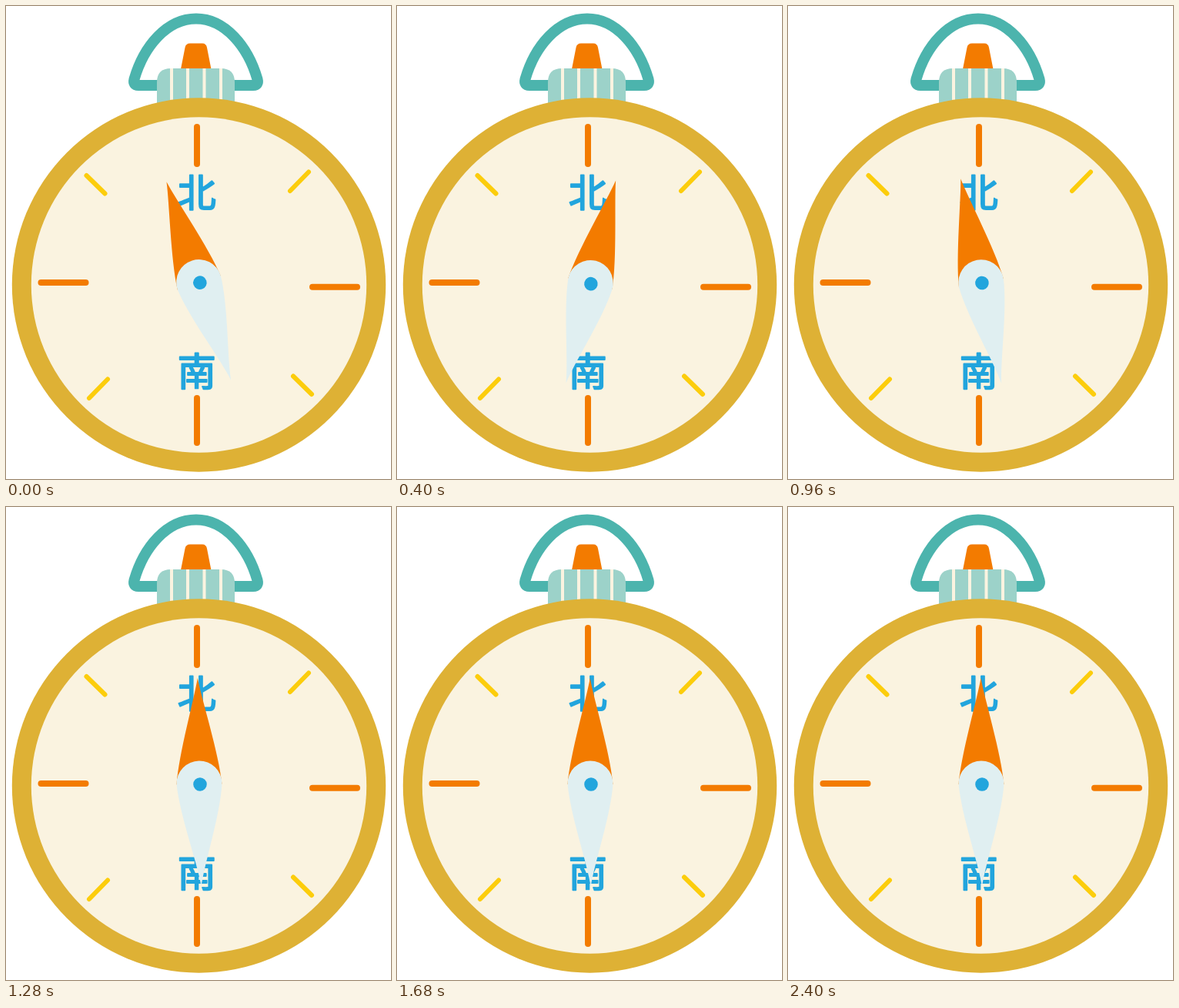
An HTML page with a canvas for the animation above (2900 ms loop, 500 px wide and 614 px high).

```html
<!DOCTYPE html>
<html lang="ja">
<head>
<meta charset="utf-8">
<title>Compass</title>
<style>
  html, body { margin: 0; width: 100%; height: 100%; overflow: hidden; background: #fff; }
  canvas { display: block; width: 500px; height: 614px; }
</style>
</head>
<body>
<canvas id="stage" width="500" height="614"></canvas>
<script>
const ctx = document.getElementById('stage').getContext('2d');

const LOOP = 2900, STEP = 80, LAST_STEP = 30;
const COLORS = {
  gold: '#deb135', cream: '#faf3e0', orange: '#f37b00', yellow: '#fccd0c',
  teal: '#4cb4ad', mint: '#9cd2c9', blue: '#22a5dd', pale: '#e0eff1'
};

// Turning points of the damped swing: [ms, degrees]
const SWING = [[0, -17.7], [460, 15.5], [975, -11], [1490, 5], [1850, -4], [2150, 2], [2400, 0]];

const handle = new Path2D('M172 103H321Q328.5 103 326.5 95C314 52 284 16.5 247 16.5C209 16.5 179 52 166.5 95Q164.500 103 172 103Z');
const button = new Path2D('M227 82L232.500 54Q233.500 48.500 239 48.500H255Q260 48.500 261 54L266.500 82Z');
const knob = new Path2D('M196 126V99Q196 81 214 81H279Q297 81 297 99V126Z');
const northHalf = new Path2D('M250.500 222C246 248 225 320 221.500 360H280.500C277 320 255 248 250.500 222Z');
const southHalf = new Path2D('M252 493C248 464 225 400 221.500 359A29.500 29.500 0 0 1 280.500 359C278 400 256 464 252 493Z');

function fill(path, color) {
  ctx.fillStyle = color;
  ctx.fill(path);
}

function line(x1, y1, x2, y2, width, color) {
  ctx.lineWidth = width;
  ctx.strokeStyle = color;
  ctx.beginPath();
  ctx.moveTo(x1, y1);
  ctx.lineTo(x2, y2);
  ctx.stroke();
}

function disc(x, y, r, color) {
  ctx.fillStyle = color;
  ctx.beginPath();
  ctx.arc(x, y, r, 0, Math.PI * 2);
  ctx.fill();
}

// A thin round outline softens the corners of the letters.
function letter(text, x, baseline) {
  ctx.font = '400 50px "Noto Sans CJK JP", "Noto Sans CJK SC", "Noto Sans CJK", sans-serif';
  ctx.textAlign = 'center';
  ctx.fillStyle = ctx.strokeStyle = COLORS.blue;
  ctx.lineWidth = 1.9;
  ctx.fillText(text, x, baseline);
  ctx.strokeText(text, x, baseline);
}

function drawCrown() {
  ctx.lineWidth = 14;
  ctx.strokeStyle = COLORS.teal;
  ctx.stroke(handle);
  fill(button, COLORS.orange);
  fill(knob, COLORS.mint);
  ctx.fillStyle = COLORS.cream;
  for (const x of [213, 234, 255.5, 277]) ctx.fillRect(x, 81, 4, 45);
}

function drawDial() {
  disc(250.5, 362, 242.7, COLORS.gold);
  disc(250.5, 362, 217.7, COLORS.cream);

  line(248, 157, 248, 205, 8, COLORS.orange);
  line(248, 509, 248, 567, 8, COLORS.orange);
  line(45.5, 359, 103.5, 359, 8, COLORS.orange);
  line(398, 364.7, 456, 364.7, 8, COLORS.orange);

  line(104.5, 220, 128.5, 243.5, 6, COLORS.yellow);
  line(393, 215.5, 369, 240, 6, COLORS.yellow);
  line(132, 484.5, 108, 509, 6, COLORS.yellow);
  line(373, 480.5, 397, 504, 6, COLORS.yellow);

  letter('北', 247.7, 260.5);
  letter('南', 247.7, 492.5);
}

function drawNeedle(degrees) {
  const px = 249.3, py = 360;
  ctx.save();
  ctx.translate(px, py);
  ctx.rotate(degrees * Math.PI / 180);
  ctx.translate(-px, -py);
  fill(northHalf, COLORS.orange);
  fill(southHalf, COLORS.pale);
  disc(252, 360, 8.8, COLORS.blue);
  ctx.restore();
}

function angleAt(ms) {
  const next = SWING.findIndex(([time]) => time > ms);
  if (next < 0) return 0;
  const [t0, a0] = SWING[next - 1], [t1, a1] = SWING[next];
  const eased = (1 - Math.cos(Math.PI * (ms - t0) / (t1 - t0))) / 2;
  return a0 + (a1 - a0) * eased;
}

const start = performance.now();

function render() {
  const ms = (performance.now() - start) % LOOP;
  const step = Math.min(LAST_STEP, Math.floor(ms / STEP));
  ctx.fillStyle = '#fff';
  ctx.fillRect(0, 0, 500, 614);
  ctx.lineCap = ctx.lineJoin = 'round';
  drawCrown();
  drawDial();
  drawNeedle(angleAt(step * STEP));
  requestAnimationFrame(render);
}
render();
</script>
</body>
</html>
```
